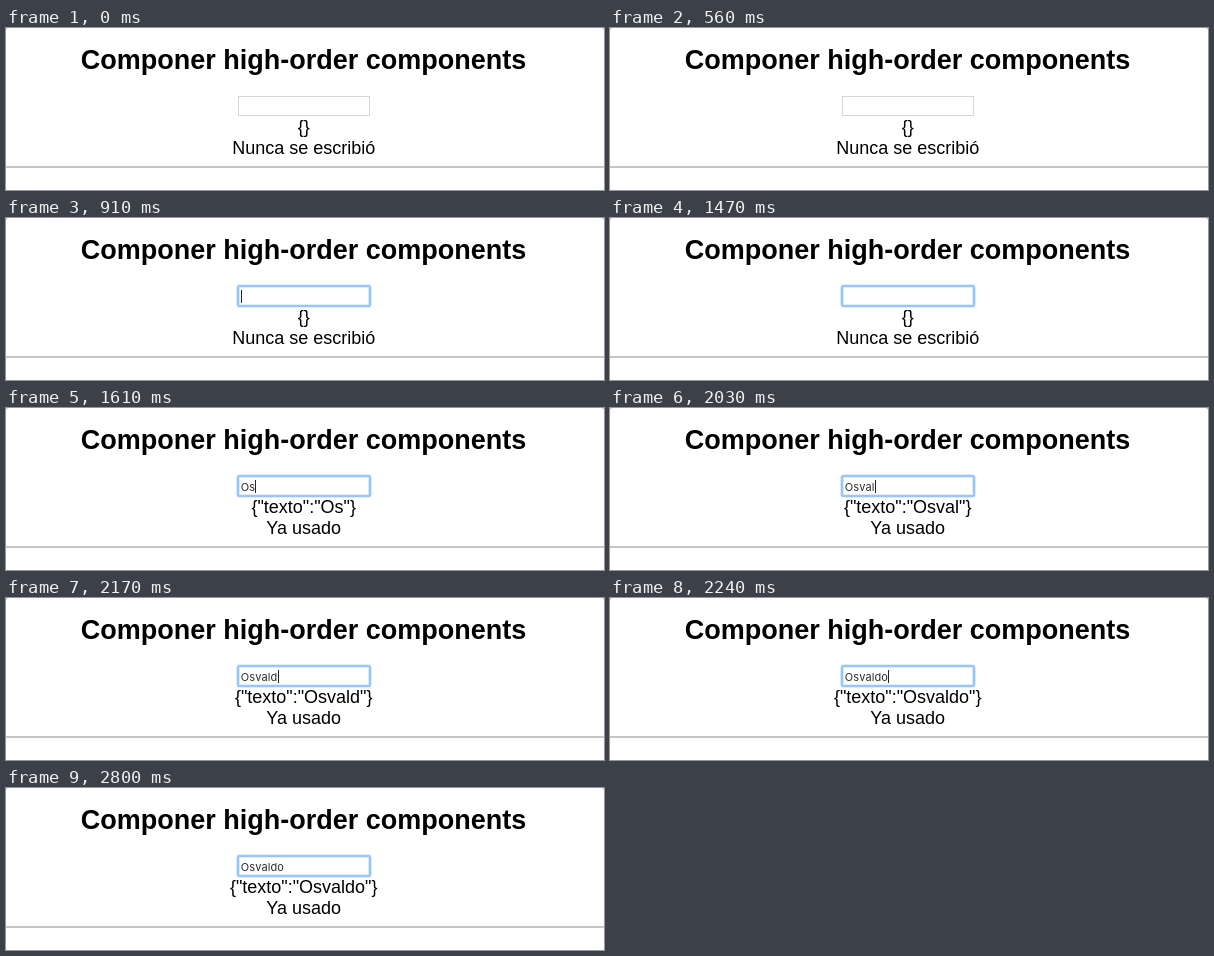
Animation of 598x162 px, one loop 3.15 s. Source, as an HTML page:

```html
<!DOCTYPE html>
<html lang="es">
<head>
<meta charset="utf-8">
<title>Componer high-order components</title>
<style>
  html, body { margin: 0; width: 100%; height: 100%; overflow: hidden; background: #fff; }
  svg { display: block; width: 598px; height: 162px; }
  text { font: 18px "Liberation Sans", Arial, sans-serif; fill: #000; text-anchor: middle; }
  .title { font-size: 27px; font-weight: bold; }
  #typed { font: 11px Inter, sans-serif; fill: #2c2c2c; text-anchor: start; letter-spacing: .1px; }
</style>
</head>
<body>
<svg viewBox="0 0 598 162">
  <path d="M0 0h3Q0 0 0 3zM598 0h-3q3 0 3 3z" fill="#bbb"/>
  <text class="title" x="297.6" y="40.5">Componer high-order components</text>
  <rect x="232.5" y="68.5" width="131" height="19" fill="#fff" stroke="#d6d6d6"/>
  <g id="ring" fill="none" stroke="#9ac6f5">
    <rect x="232" y="68" width="132" height="20" rx="2" stroke-width="4" opacity=".3"/>
    <rect x="232" y="68" width="132" height="20" rx="1.5" stroke-width="2.2"/>
  </g>
  <text id="typed" x="234.8" y="82.5"></text>
  <rect id="caret" y="72" width="1" height="13" fill="#222"/>
  <text id="state" x="297.7" y="105"></text>
  <text id="status" x="297.7" y="126"></text>
  <rect y="138.5" width="598" height="1" fill="#8c8c8c"/>
</svg>
<script>
  const LOOP = 3150, FOCUS = 910, NAME = "Osvaldo";
  const keyTimes = [1610, 1610, 1820, 1960, 2030, 2170, 2240];
  const caretSpans = [[FOCUS, 1470], [1610, 2800]];
  const [ring, typed, caret, state, status_] =
    ["ring", "typed", "caret", "state", "status"].map(id => document.getElementById(id));
  const show = (el, on) => el.setAttribute("visibility", on ? "visible" : "hidden");
  let shown = null;

  function setText(value) {
    if (value === shown) return;
    shown = value;
    typed.textContent = value;
    state.textContent = JSON.stringify(value ? { texto: value } : {});
    status_.textContent = value ? "Ya usado" : "Nunca se escribió";
  }

  function draw(now) {
    const t = now % LOOP;
    setText(NAME.slice(0, keyTimes.filter(k => t >= k).length));
    show(ring, t >= FOCUS);
    show(caret, caretSpans.some(([from, to]) => t >= from && t < to));
    caret.setAttribute("x", Math.round(235 + (shown ? typed.getComputedTextLength() : 0)));
  }

  let start;
  function tick(now) {
    start ??= now;
    draw(now - start);
    requestAnimationFrame(tick);
  }
  draw(0);
  requestAnimationFrame(tick);
</script>
</body>
</html>
```
